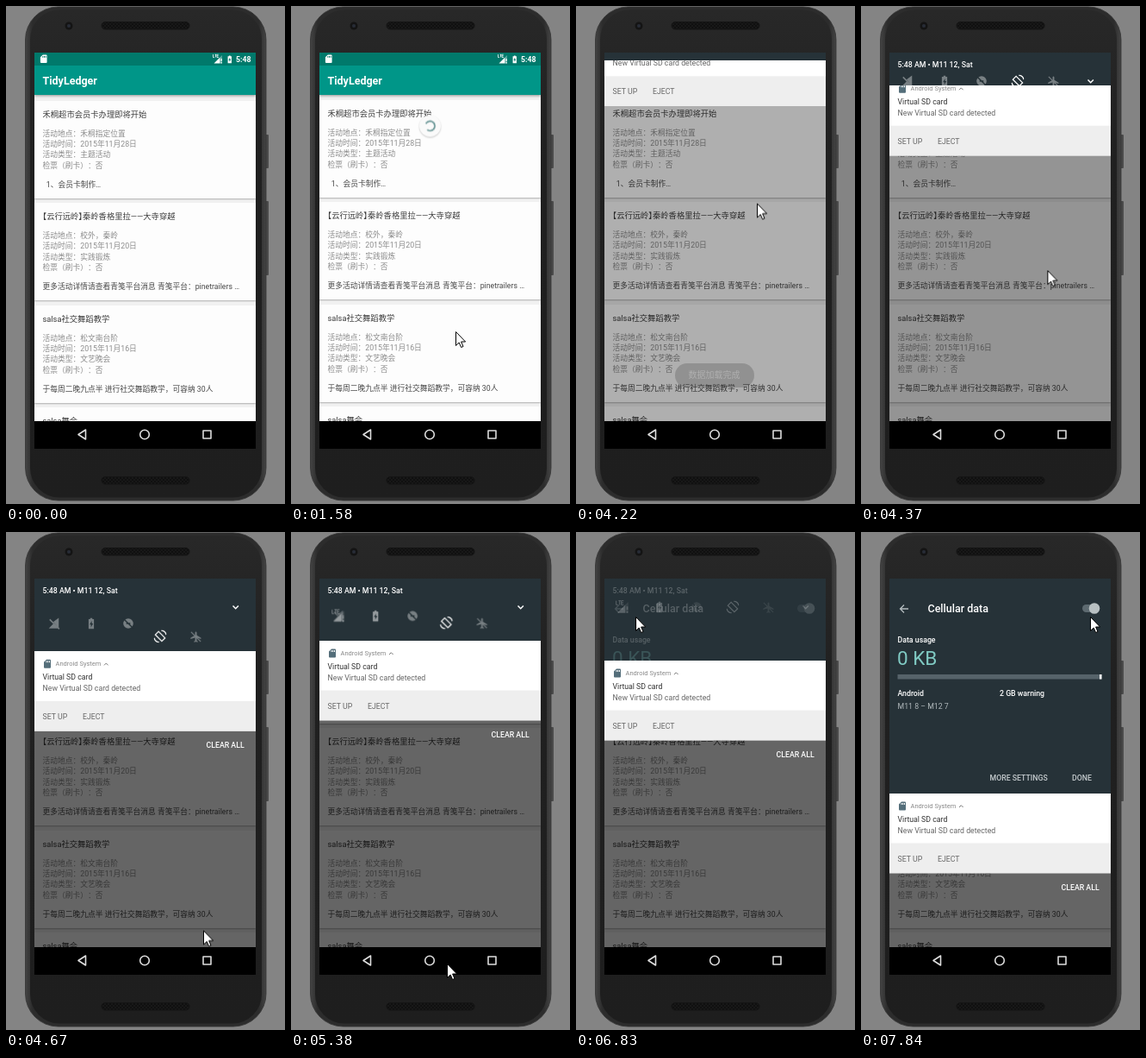
Animation of 324x577 px, one loop 8000 ms. Source, as an HTML page:

```html
<!DOCTYPE html>
<html lang="zh-CN">
<head>
<meta charset="utf-8">
<title>Pull to refresh</title>
<style>
html, body { margin: 0; width: 100%; height: 100%; overflow: hidden; background: #848484; }
body { position: relative; font: 8.75px/0 Roboto, "Noto Sans CJK SC", sans-serif; text-spacing-trim: space-all; }
svg { position: absolute; overflow: visible; }
.phone { left: 0; top: 0; }
.screen, .screen div, article, .cursor { position: absolute; }
.screen { left: 33px; top: 54px; width: 257px; height: 459px; overflow: hidden; background: #f1f1f1; }

/* single-line labels: top is the vertical centre of the text */
.t { position: absolute; white-space: pre; line-height: 0; }
.m { font-weight: 500; }
.big { font-size: 12.5px; font-weight: 500; }

.status { width: 257px; height: 15px; background: #00796b; color: #fff; }
.bar { top: 15px; width: 257px; height: 34px; background: #009688; color: #fff; box-shadow: 0 1px 3px rgba(0,0,0,.4); }
.nav { top: 427px; width: 257px; height: 32px; background: #000; }

.list { width: 257px; height: 428px; top: 0; }
article { left: 0; width: 257px; height: 113px; background: #fdfdfd; box-shadow: 0 1px 1.5px rgba(0,0,0,.27); white-space: pre; }
article h2 { position: absolute; margin: 0; left: 9.5px; top: 16.3px; font-size: 9.3px; line-height: 0; font-weight: 400; color: #3c3c3c; }
article p { position: absolute; margin: 0; left: 9.5px; top: 32.2px; line-height: 12.3px; color: #8c8c8c; }
article span { position: absolute; left: 9.5px; top: 97.3px; color: #484848; }
article i { font-style: normal; font-feature-settings: "halt"; }

.spin { left: 115.5px; top: 0; width: 25px; height: 25px; border-radius: 50%; background: #fafafa; box-shadow: 0 1px 2px rgba(0,0,0,.22); }
.toast { left: 82px; top: 360px; width: 92px; height: 27.5px; border-radius: 14px; background: #636363; color: #fff; font-size: 10px; }
.scrim { width: 257px; height: 428px; background: #000; }
.shade { width: 257px; height: 428px; overflow: hidden; }
.card { top: 0; width: 257px; height: 93px; background: #fff; color: #666; }
.card .foot { top: 58px; width: 257px; height: 35px; background: #eee; }
.head { width: 257px; overflow: hidden; background: #263238; color: #fff; }
.quick, .detail { width: 257px; height: 248px; }
.dim { opacity: .38; }

.cursor, .list, .spin, .spin svg, .toast, .scrim, .card, .clear, .head, .quick, .detail, .low, .lower, .on, .off {
  animation: 8s linear infinite both;
}
.cursor { left: 0; top: 0; animation-name: point; }
.list { animation-name: nudge; }
.spin { animation-name: spin; }
.spin svg { left: 0; top: 0; animation-name: turn; }
.toast { animation-name: toast; }
.scrim { animation-name: scrim; }
.card { animation-name: card; }
.clear { animation-name: clear; }
.head { animation-name: head; }
.quick { animation-name: quick; }
.detail { animation-name: detail; }
.low { animation-name: low; }
.lower { animation-name: lower; }
.on { animation-name: on; }
.off { animation-name: off; }

@keyframes point {
  0%, 1.5% { transform: translate(278px, 577px); }
  11%, 12% { transform: translate(185px, 208px); }
  16.5%, 34.25% { transform: translate(191px, 377px); }
  38.9%, 42% { transform: translate(174px, 208px); }
  46.6%, 48.7% { transform: translate(202px, 57px); }
  52.75% { transform: translate(210px, 228px); }
  58.4% { transform: translate(229px, 462px); }
  60.75% { transform: translate(225px, 550px); }
  63.25%, 69% { transform: translate(181px, 500px); }
  73% { transform: translate(157px, 377px); }
  75.9%, 76.75% { transform: translate(115px, 206px); }
  80.6%, 85% { transform: translate(55px, 95px); }
  90.25%, 92.1% { transform: translate(245px, 135px); }
  98%, 100% { transform: translate(266px, 98px); }
}
@keyframes nudge {
  0%, 12% { transform: translateY(1px); }
  12.01%, 100% { transform: none; }
}
@keyframes spin {
  0%, 13% { transform: translateY(65px); opacity: 0; }
  13.5% { transform: translateY(70px); opacity: .8; }
  16.5%, 17.2% { transform: translateY(112px); opacity: 1; }
  19.5%, 25% { transform: translateY(72.5px); opacity: 1; }
  27%, 100% { transform: translateY(72.5px) scale(0); opacity: 1; }
}
@keyframes turn { to { transform: rotate(2880deg); } }
@keyframes toast {
  0%, 25.5% { opacity: 0; }
  28.3%, 51.5% { opacity: 1; }
  53.25%, 100% { opacity: 0; }
}
@keyframes scrim {
  0%, 48.7% { opacity: 0; }
  52.75% { opacity: .31; }
  58%, 100% { opacity: .6; }
}
@keyframes card {
  0%, 48.7% { transform: translateY(-93px); }
  52.75% { transform: translateY(-31px); }
  55.4% { transform: translateY(50px); }
  58.4% { transform: translateY(84px); }
  60.75% { transform: translateY(105px); }
  63.25%, 66.25% { transform: translateY(96px); animation-timing-function: ease-out; }
  69%, 83.5% { transform: translateY(50px); animation-timing-function: ease-in-out; }
  89.25%, 100% { transform: translateY(248.5px); }
}
@keyframes head {
  0%, 48.7% { height: 0; }
  52.75% { height: 9px; }
  55.4% { height: 50px; }
  58.4% { height: 84px; }
  60.75% { height: 105px; }
  63.25%, 66.25% { height: 96px; animation-timing-function: ease-out; }
  69%, 83.5% { height: 50px; animation-timing-function: ease-in-out; }
  89.25%, 100% { height: 248.5px; }
}
@keyframes clear {
  0%, 55.4% { opacity: 0; }
  57.5%, 100% { opacity: 1; }
}
@keyframes quick {
  0%, 83.5% { opacity: 1; }
  86%, 100% { opacity: 0; }
}
@keyframes detail {
  0%, 84.5% { opacity: 0; }
  88.5%, 100% { opacity: 1; }
}
@keyframes low {
  0%, 55.4% { transform: none; }
  58.4% { transform: translate(2px, 19px); }
  60.75% { transform: translate(3px, 25px); }
  63.25%, 66.25% { transform: translate(2.5px, 22px); animation-timing-function: ease-out; }
  69%, 100% { transform: none; }
}
@keyframes lower {
  0%, 55.4% { transform: none; }
  58.4% { transform: translate(-3px, 34px); }
  60.75% { transform: translate(-4px, 43px); }
  63.25%, 66.25% { transform: translate(-3.5px, 39px); animation-timing-function: ease-out; }
  69%, 100% { transform: none; }
}
@keyframes on {
  0%, 66.25% { opacity: 0; }
  69%, 100% { opacity: 1; }
}
@keyframes off {
  0%, 66.25% { opacity: .38; }
  69%, 100% { opacity: 0; }
}
</style>
</head>
<body>
<svg width="0" height="0">
  <defs>
    <pattern id="mesh" width="4" height="4" patternUnits="userSpaceOnUse">
      <rect width="4" height="4" fill="#101010"/>
      <circle cx="1" cy="1" r=".7" fill="#242424"/><circle cx="3" cy="3" r=".7" fill="#242424"/>
    </pattern>
    <linearGradient id="rim"><stop offset="0" stop-color="#444"/><stop offset=".03" stop-color="#2c2c2c"/><stop offset=".97" stop-color="#2c2c2c"/><stop offset="1" stop-color="#444"/></linearGradient>
    <linearGradient id="body" x2="0" y2="1"><stop offset="0" stop-color="#282828"/><stop offset=".3" stop-color="#202020"/><stop offset="1" stop-color="#1e1e1e"/></linearGradient>
    <symbol id="sd" viewBox="0 0 24 24"><path fill-rule="evenodd" d="M18 2h-8L4 8v12q0 2 2 2h12q2 0 2-2V4q0-2-2-2zM9 5h2v4H9zm3.500 0h2v4h-2zM16 5h2v4h-2z"/></symbol>
    <symbol id="lte" viewBox="0 0 24 24">
      <path d="M3 22h14V8z" /><path d="M17 8l5-5v19h-5z" opacity=".35"/><path d="M19 11h2.500v6H19zm0 8h2.500v3H19z"/>
      <path d="M1 1v7h3M5 1h4M7 1v7M14 1h-4v7h4M10 4.500h3.500" fill="none" stroke="currentColor" stroke-width="1.500"/>
    </symbol>
    <symbol id="cell" viewBox="0 0 24 24"><path d="M7 7l2.500 2.500L21 1v19L4 3 2 5l8 8-9 9h18l2 2 2-2z"/></symbol>
    <symbol id="bat" viewBox="0 0 24 24"><path fill-rule="evenodd" d="M7 4h3V2h4v2h3v18H7zM13 7l-4 7h2.500v5l4-7H13z"/></symbol>
    <symbol id="dnd" viewBox="0 0 24 24"><circle cx="12" cy="12" r="10"/><path d="M2 2l20 20M8 12h8" stroke="#263238" stroke-width="2.500"/></symbol>
    <symbol id="turn" viewBox="0 0 24 24"><g fill="none" stroke="currentColor" stroke-width="2"><path d="M9 3l12 12-6 6L3 9z"/><path d="M1 15q1 7 9 8M23 9q-1-7-9-8"/></g></symbol>
    <symbol id="plane" viewBox="0 0 24 24"><path d="M10.500 9V4q1.500-3 3 0v5l8 5v2l-8-2.500V19l2 1.500V22l-3.500-1-3.500 1v-1.500l2-1.500v-5.500L2 16v-2z"/><path d="M3 3l18 18" stroke="currentColor" stroke-width="2"/></symbol>
  </defs>
</svg>

<svg class="phone" width="324" height="577">
  <rect x="301" y="149" width="4" height="39" rx="1" fill="#4a4a4a"/>
  <rect x="301" y="226" width="4" height="86" rx="1" fill="#4a4a4a"/>
  <rect x="22.500" y="1" width="279.500" height="572" rx="38" fill="url(#rim)" stroke="#333" stroke-width=".8"/>
  <rect x="28" y="4.500" width="269" height="565" rx="34" fill="url(#body)"/>
  <circle cx="73" cy="23" r="4.500" fill="#141414"/><circle cx="73" cy="23" r="2" fill="#272c36"/>
  <rect x="111" y="18.500" width="102" height="8.500" rx="4.200" fill="url(#mesh)" stroke="#141414"/>
  <rect x="111" y="545.500" width="102" height="8.500" rx="4.200" fill="url(#mesh)" stroke="#141414"/>
</svg>

<div class="screen">
  <div class="list">
    <article style="top:54.5px"><h2>禾桐超市会员卡办理即将开始</h2><p>活动地点：禾桐指定位置
活动时间：2015年11月28日
活动类型：主题活动
检票（刷卡）：否</p><span>  1、会员卡制作…</span></article>
    <article style="top:173px"><h2><i>【</i>云行远岭<i>】</i>秦岭香格里拉——大寺穿越</h2><p>活动地点：校外，秦岭
活动时间：2015年11月20日
活动类型：实践锻炼
检票（刷卡）：否</p><span>更多活动详情请查看青笺平台消息 青笺平台：pinetrailers …</span></article>
    <article style="top:291.5px"><h2>salsa社交舞蹈教学</h2><p>活动地点：松文南台阶
活动时间：2015年11月16日
活动类型：文艺晚会
检票（刷卡）：否</p><span>于每周二晚九点半 进行社交舞蹈教学，可容纳 30人</span></article>
    <article style="top:410px"><h2>salsa舞会</h2></article>
  </div>

  <div class="spin"><svg width="25" height="25"><circle cx="12.500" cy="12.500" r="5.500" fill="none" stroke="#5f8f8f" stroke-width="1.700" stroke-dasharray="26 9"/></svg></div>
  <div class="bar"><span class="t big" style="left:9.5px;top:17.5px;font-weight:600">TidyLedger</span></div>
  <div class="status">
    <svg width="257" height="15" fill="#fff" color="#fff">
      <use href="#sd" x="5" y="1.500" width="11.500" height="11.500"/>
      <use href="#lte" x="207" y="1.500" width="12" height="12"/>
      <use href="#bat" x="221.500" y="2.500" width="10.500" height="10.500"/>
    </svg>
    <span class="t" style="left:234px;top:7.5px;font-weight:600">5:48</span>
  </div>

  <div class="toast"><span class="t" style="left:15.5px;top:14px">数据加载完成</span></div>
  <div class="scrim"></div>

  <div class="shade">
    <div class="card">
      <svg width="257" height="93" fill="#546e7a"><use href="#sd" x="9" y="9" width="12" height="12"/><path d="M81 16.500l2.300-2.300 2.300 2.300" fill="none" stroke="#777"/></svg>
      <span class="t" style="left:24.5px;top:15px;font-size:7.5px;color:#888">Android System</span>
      <span class="t" style="left:9.5px;top:30px;color:#333">Virtual SD card</span>
      <span class="t" style="left:9.5px;top:42.500px">New Virtual SD card detected</span>
      <div class="foot">
        <span class="t" style="left:9.5px;top:17.500px">SET UP</span>
        <span class="t" style="left:56px;top:17.500px">EJECT</span>
      </div>
      <span class="t m clear" style="left:199.5px;top:108.500px;color:#fff">CLEAR ALL</span>
    </div>

    <div class="head">
      <div class="quick">
        <span class="t m" style="left:9.5px;top:14px">5:48 AM • M11 12, Sat</span>
        <svg width="257" height="100" fill="#fff" color="#fff">
          <g class="low">
            <g class="off"><use href="#cell" x="14" y="26" width="14" height="14"/><use href="#bat" x="56.500" y="25.500" width="15" height="15"/></g>
            <g class="on"><use href="#lte" x="12.500" y="25" width="17" height="16"/><use href="#bat" x="56.500" y="25.500" width="15" height="15"/></g>
            <use class="dim" href="#dnd" x="100" y="26" width="14" height="14"/>
          </g>
          <g class="lower">
            <use href="#turn" x="141.500" y="25.500" width="15" height="15"/>
            <use class="dim" href="#plane" x="183" y="26" width="15" height="15"/>
          </g>
          <path d="M230.500 31.500l3.200 3.200 3.200-3.200" fill="none" stroke="#fff" stroke-width="1.500"/>
        </svg>
      </div>
      <div class="detail">
        <svg width="257" height="248">
          <path d="M22 35H13M17 30.500L12.500 35l4.500 4.500" fill="none" stroke="#b4bcbf" stroke-width="1.300"/>
          <rect x="224" y="30" width="18" height="9" rx="4.500" fill="#5d6a70"/>
          <circle cx="238" cy="34.500" r="6.300" fill="#b8c0c2"/>
          <path d="M9.500 111h237v5.500h-237z" fill="#56636a"/><path d="M244 111h2.500v5.500H244z" fill="#fff"/>
        </svg>
        <span class="t big" style="left:44.500px;top:35px">Cellular data</span>
        <span class="t m" style="left:9.5px;top:70.500px">Data usage</span>
        <span class="t" style="left:9px;top:92px;font-size:22.500px;color:#80cbc4">0 KB</span>
        <span class="t m" style="left:9.5px;top:132.500px">Android</span>
        <span class="t m" style="left:128px;top:132.500px">2 GB warning</span>
        <span class="t" style="left:9.5px;top:147.500px;color:#b0b8bb">M11 8 – M12 7</span>
        <span class="t m" style="left:116.500px;top:230.500px;color:#c5cbce">MORE SETTINGS</span>
        <span class="t m" style="left:212px;top:230.500px;color:#c5cbce">DONE</span>
      </div>
    </div>
  </div>

  <div class="nav">
    <svg width="257" height="32" fill="none" stroke="#ddd" stroke-width="1.600" stroke-linejoin="round">
      <path d="M59.500 10v11l-8.500-5.500z"/><circle cx="128" cy="15.500" r="5.300"/><rect x="196" y="11" width="9" height="9"/>
    </svg>
  </div>
</div>

<svg class="cursor" width="12" height="19"><path d="M.5.5v16l3.700-3.500 2.400 5.500 2.400-1-2.400-5.500h5z" fill="#fff" stroke="#000"/></svg>
</body>
</html>
```
